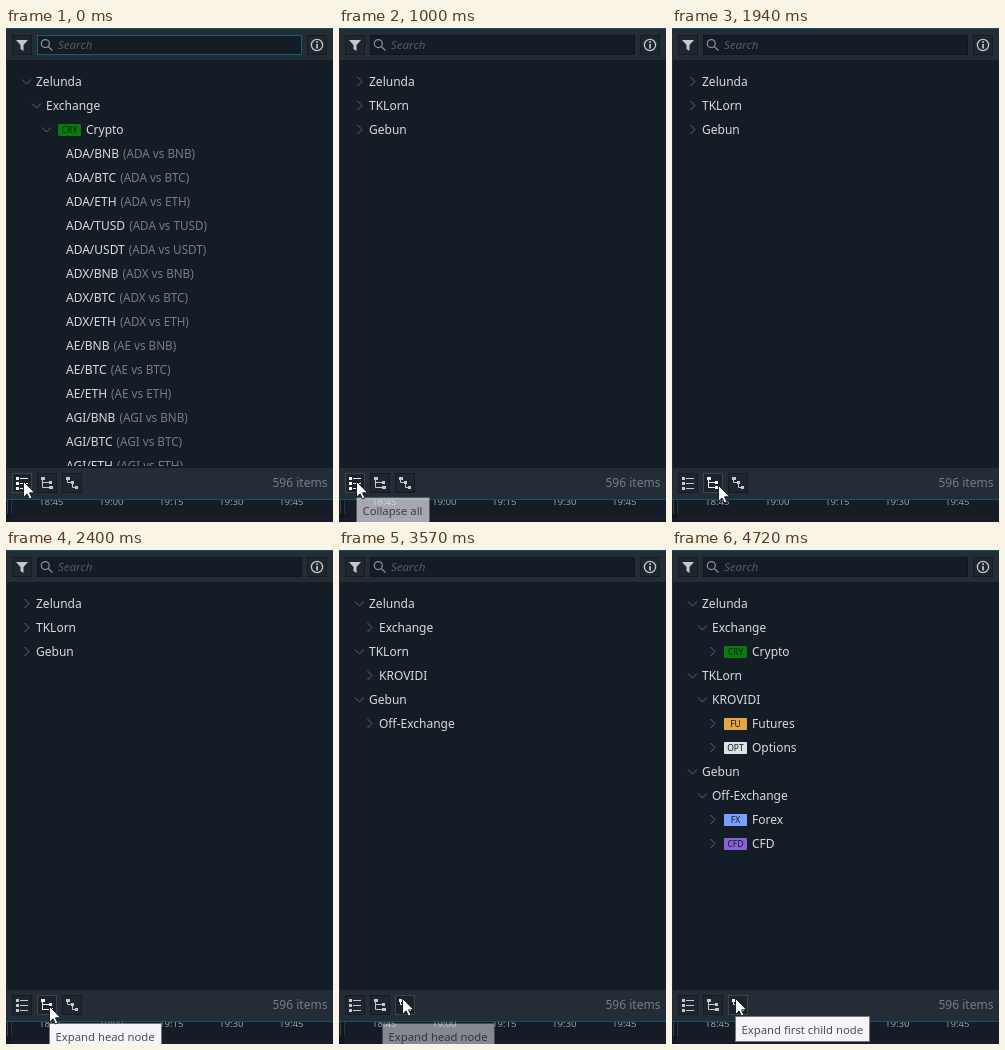
Write an HTML page that moves like this. It is 327 px wide and 494 px high and loops after 5500 ms.

```html
<!DOCTYPE html>
<html lang="en">
<head>
<meta charset="utf-8">
<title>Symbol tree</title>
<style>
  html, body { margin: 0; width: 100%; height: 100%; overflow: hidden; background: #151c26; }
  svg { display: block; width: 327px; height: 494px; }
  text { font: 12px "Noto Sans", "Open Sans", sans-serif; fill: #d6dadd; white-space: pre; }
  .dim { fill: #737d85; }
  .pair { font-size: 11.7px; }
  .hint { font-size: 11.5px; font-style: italic; fill: #525d66; }
  .axis text { font-size: 9.6px; fill: #969da3; }
  .badge { font-size: 8.5px; fill: #10181c; text-anchor: middle; }
  .chev { fill: none; stroke: #626b70; }
  .btn rect { fill: #1e272f; stroke: #141b22; }
  .btn .solid { fill: #c3c9cd; }
  .btn .line { fill: none; stroke: #c3c9cd; }
  .btn.hover rect { fill: #1b242c; stroke: #3a444c; }
  .btn.hover .solid { fill: #f2f4f5; }
  .btn.hover .line { stroke: #f2f4f5; }
  .btn.down rect { fill: #0d667d; stroke: #147990; }
  .tip rect { fill: #f5f4f8; stroke: #777; }
  .tip text { font-size: 11.3px; fill: #505050; }
</style>
</head>
<body>
<svg viewBox="0 0 327 494">
  <defs><clipPath id="list"><rect x="1" y="32" width="326" height="406"/></clipPath></defs>

  <rect width="327" height="494" fill="#151c26"/>
  <g class="axis" id="axis"></g>
  <rect y="472" width="5" height="22" fill="#10161d"/>
  <rect x="1" y="472" width="1" height="14" fill="#39424a"/>
  <rect x="5" y="472" width="1" height="14" fill="#2b333c"/>
  <rect y="491" width="327" height="1" fill="#211d2d"/>

  <rect width="327" height="472" fill="#242c35"/>
  <rect width="327" height="1" fill="#06566a"/>
  <rect x="1" y="32" width="326" height="408" fill="#141d26"/>
  <rect y="471" width="327" height="1" fill="#0a566a"/>

  <g class="btn">
    <rect x="6.5" y="7.5" width="19" height="19"/>
    <path class="solid" d="M10 12H22L17.5 17V23L14.5 21V17Z"/>
  </g>
  <g class="btn">
    <rect x="301.5" y="7.5" width="19" height="19"/>
    <circle class="line" cx="311" cy="17" r="5.6" stroke-width="1.3"/>
    <path class="solid" d="M310.2 13.3h1.7v1.7h-1.7zM310.2 16h1.7v4.5h-1.7z"/>
  </g>
  <rect id="field" x="31.5" y="7.5" width="264" height="19" fill="#141d26"/>
  <g fill="none" stroke="#89939a" stroke-width="1.2">
    <circle cx="39.3" cy="15.6" r="4"/><path d="M42.2 18.5L46.5 22.5"/>
  </g>
  <text class="hint" x="52" y="21">Search</text>
  <rect id="caret" x="52" y="11" width="1" height="12" fill="#e4e7e9"/>

  <g id="trees" clip-path="url(#list)"></g>

  <g class="btn tool">
    <rect x="6.5" y="445.5" width="19" height="19"/>
    <path class="solid" d="M10 449h3v3h-3zM10 454h3v3h-3zM10 459h3v3h-3z"/>
    <path class="line" d="M14 450.5H22M14 455.5H22M14 460.5H22"/>
  </g>
  <g class="btn tool">
    <rect x="31.5" y="445.5" width="19" height="19"/>
    <path class="solid" d="M35 449h4v3h-4zM43 453h3v3h-3zM43 458h4v3h-4z"/>
    <path class="line" d="M36.5 451V459.5H43M36.5 454.5H43"/>
  </g>
  <g class="btn tool">
    <rect x="56.5" y="445.5" width="19" height="19"/>
    <path class="solid" d="M60 449h4v3h-4zM65 453h3v3h-3zM69 458h3v3h-3z"/>
    <path class="line" d="M61.5 452V454.5H65M66.5 456V459.5H69"/>
  </g>
  <text class="dim" x="266.5" y="458.5">596 items</text>

  <g id="tips"></g>
  <path id="cursor" d="M.5 .5V16.2L4.1 12.9L6.5 18L8.9 17L6.5 11.8H11.6Z" fill="#fff" stroke="#111" stroke-width=".9"/>
</svg>

<script>
const LOOP = 5500;
const $ = id => document.getElementById(id);

function add(parent, tag, attrs, text) {
  const el = document.createElementNS("http://www.w3.org/2000/svg", tag);
  for (const k in attrs) el.setAttribute(k, attrs[k]);
  if (text) el.textContent = text;
  parent.appendChild(el);
  return el;
}

["18:45", "19:00", "19:15", "19:30", "19:45"].forEach((s, i) =>
  add($("axis"), "text", { x: 33 + 60 * i, y: 477 }, s));

// A row is [depth, label, open, badge].
const badges = { CRY: "#047d0b", FU: "#e5a642", OPT: "#dce3e1", FX: "#789eff", CFD: "#8961d6" };
const pairs = ["ADA/BNB", "ADA/BTC", "ADA/ETH", "ADA/TUSD", "ADA/USDT", "ADX/BNB", "ADX/BTC",
  "ADX/ETH", "AE/BNB", "AE/BTC", "AE/ETH", "AGI/BNB", "AGI/BTC", "AGI/ETH"];
const feeds = [
  ["Zelunda", "Exchange", [["Crypto", "CRY"]]],
  ["TKLorn", "KROVIDI", [["Futures", "FU"], ["Options", "OPT"]]],
  ["Gebun", "Off-Exchange", [["Forex", "FX"], ["CFD", "CFD"]]]
];

function rowsTo(depth) {
  const rows = [];
  for (const [name, venue, kinds] of feeds) {
    rows.push([0, name, depth > 0]);
    if (depth > 0) rows.push([1, venue, depth > 1]);
    if (depth > 1) for (const [kind, code] of kinds) rows.push([2, kind, false, code]);
  }
  return rows;
}

function drawTree(rows) {
  const g = add($("trees"), "g", {});
  rows.forEach(([depth, label, open, code], i) => {
    const y = 54 + 24 * i;
    const x = 20.5 + 10 * depth;
    if (depth === 3) {
      const t = add(g, "text", { x: 60, y: y + 4 }, label);
      add(t, "tspan", { class: "dim pair", dx: 4 }, `(${label.replace("/", " vs ")})`);
      return;
    }
    const d = open ? `M${x - 4.5} ${y - 2.5}l4.5 4.5l4.5 -4.5` : `M${x - 2} ${y - 5}l4.5 4.5l-4.5 4.5`;
    add(g, "path", { class: "chev", d });
    if (code) {
      add(g, "rect", { x: 52, y: y - 6, width: 23, height: 12, rx: 1, fill: badges[code] });
      add(g, "text", { class: "badge", x: 63.5, y: y + 3.2 }, code);
    }
    add(g, "text", { x: code ? 80 : x + 9.5, y: y + 4 }, label);
  });
  return g;
}

const full = [[0, "Zelunda", true], [1, "Exchange", true], [2, "Crypto", true, "CRY"],
  ...pairs.map(p => [3, p])];
const trees = [full, rowsTo(0), rowsTo(1), rowsTo(2)].map(drawTree);

const tips = [[17, 469, 74, "Collapse all"], [43, 473, 113, "Expand head node"],
  [63, 466, 135, "Expand first child node"]].map(([x, y, w, s]) => {
  const g = add($("tips"), "g", { class: "tip" });
  add(g, "rect", { x: x + .5, y: y + .5, width: w - 1, height: 25 });
  add(g, "text", { x: x + 6.5, y: y + 17.5 }, s);
  return g;
});
const tools = [...document.querySelectorAll(".tool")];

// Step tables: [start ms, value...]
const treeSteps = [[0, 0], [920, 1], [2930, 2], [4630, 3]];
const downSteps = [[0, -1], [920, 0], [1000, -1], [2930, 1], [3010, -1], [4630, 2], [4720, -1]];
const moves = [[0, 17, 453], [1690, 21, 454], [1770, 31, 456], [1860, 41, 457], [1940, 46, 457],
  [2150, 43, 456], [3240, 45, 455], [3320, 49, 453], [3400, 54, 451], [3480, 59, 449], [3550, 63, 448]];
const fades = [
  [[0, 0], [230, .25], [310, .5], [380, .8], [460, 1], [1000, .65], [1080, .3], [1150, 0]],
  [[0, 0], [2320, .5], [2400, 1], [3480, .75], [3550, .5], [3630, .25], [3710, 0]],
  [[0, 0], [4020, .35], [4100, .7], [4170, 1]]
];

function at(steps, t) {
  let hit = steps[0];
  for (const s of steps) if (s[0] <= t) hit = s;
  return hit;
}

function render(t) {
  const tree = at(treeSteps, t)[1];
  const down = at(downSteps, t)[1];
  const [, x, y] = at(moves, t);
  const over = x < 28 ? 0 : x < 54 ? 1 : 2;

  trees.forEach((g, i) => g.style.display = i === tree ? "" : "none");
  tools.forEach((b, i) => {
    b.classList.toggle("hover", i === over);
    b.classList.toggle("down", i === down);
  });
  tips.forEach((g, i) => g.style.opacity = at(fades[i], t)[1]);
  $("cursor").setAttribute("transform", `translate(${x} ${y})`);
  $("field").setAttribute("stroke", t < 920 ? "#0b6077" : "#0f161c");
  $("caret").style.display = t >= 310 && t < 920 ? "" : "none";
}

const start = performance.now();
function tick() {
  render((performance.now() - start) % LOOP);
  requestAnimationFrame(tick);
}
tick();
</script>
</body>
</html>
```
